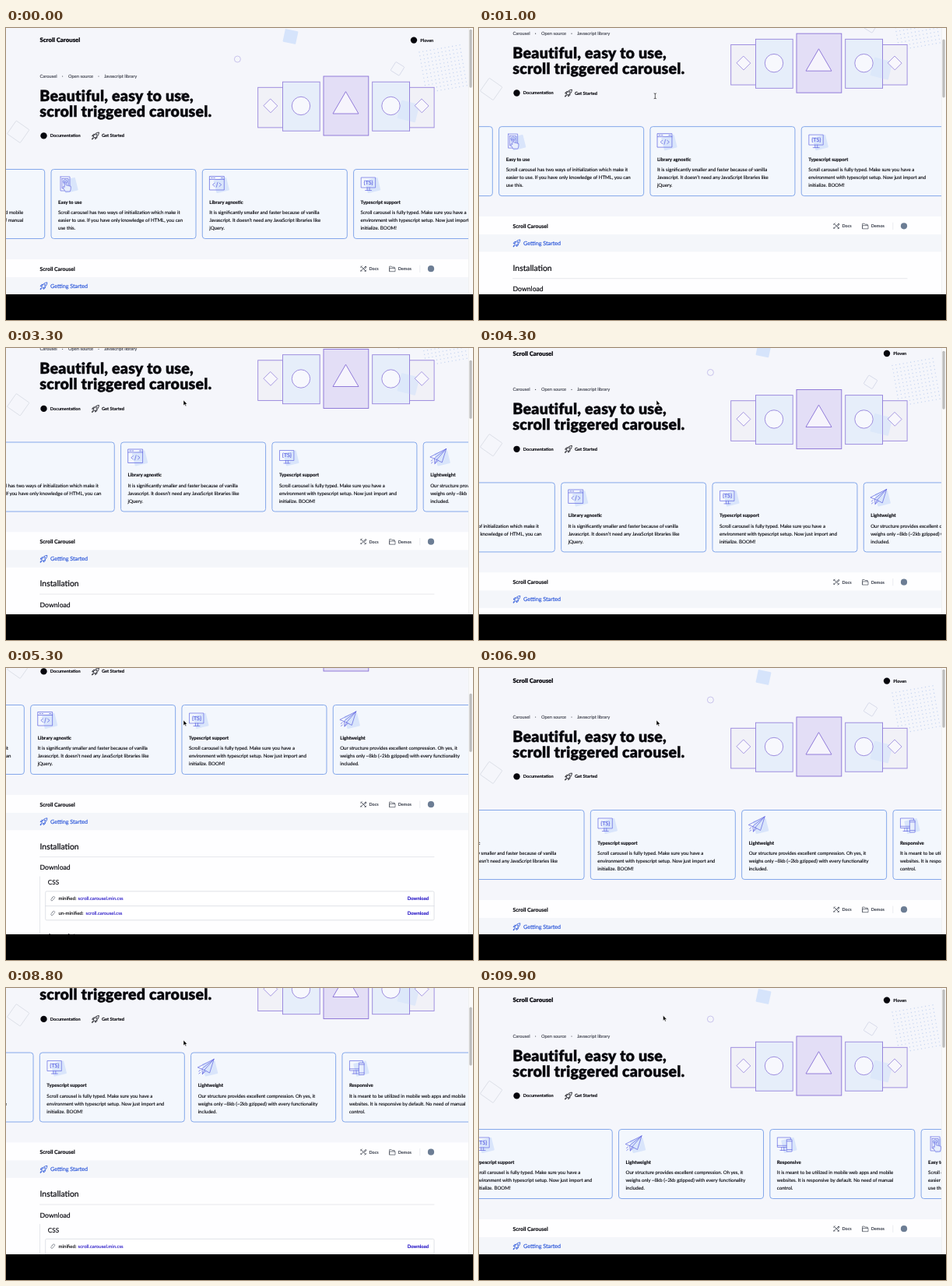
An HTML page that plays this animation: 600 by 375 pixels, repeating every 10000 ms.

```html
<!DOCTYPE html>
<html lang="en">
<head>
<meta charset="utf-8">
<title>Scroll Carousel</title>
<style>
  html, body { margin: 0; width: 100%; height: 100%; overflow: hidden; background: #000; }
  svg { display: block; width: 600px; height: 375px; }
  text { font-family: Lato, "Open Sans", sans-serif; text-rendering: geometricPrecision; white-space: pre; }
  .title { letter-spacing: .22px; }
  .line { fill: none; stroke-linecap: round; stroke-linejoin: round; }
</style>
</head>
<body>
<svg id="stage" viewBox="0 0 600 375"></svg>
<script>
const LOOP = 10000, STEP = 100, VIEW = 342;
const GAP = 194.3, FIRST = 58, CARD_TOP = 181.5, RATIO = 0.59;
const INK = '#06060c', INDIGO = '#5a5fe0', BLUE = '#2350d8', LINK = '#2716c6', GREY = '#474c58';

// Scroll position over time: [ms, px]
const scrollKeys = [
  [0, 0], [1900, 97], [2700, 119], [2800, 119], [3300, 60.5], [4100, -1],
  [5300, 134], [5600, 136.5], [5700, 136.5], [6900, -1], [8200, 133.5],
  [8500, 133.5], [8800, 98.5], [9600, 1], [9900, 0], [10000, 0]
];

const cards = [
  ['phone', 'Easy to use',
    'Scroll carousel has two ways of initialization which make it',
    'easier to use. If you have only knowledge of HTML, you can', 'use this.'],
  ['code', 'Library agnostic',
    'It is significantly smaller and faster because of vanilla',
    'Javascript. It doesn’t need any JavaScript libraries like', 'jQuery.'],
  ['types', 'Typescript support',
    'Scroll carousel is fully typed. Make sure you have a',
    'environment with typescript setup. Now just import and', 'initialize. BOOM!'],
  ['plane', 'Lightweight',
    'Our structure provides excellent compression. Oh yes, it',
    'weighs only ~8kb (~2kb gzipped) with every functionality', 'included.'],
  ['devices', 'Responsive',
    'It is meant to be utilized in mobile web apps and mobile',
    'websites. It is responsive by default. No need of manual', 'control.']
];

// y is the optical middle of the line; the thin stroke gives a medium weight
const text = (x, y, size, str, weight = 400, fill = INK, anchor = 'start') =>
  `<text x="${x}" y="${y + size * 0.35}" font-size="${size}" font-weight="${weight}" fill="${fill}" stroke="${fill}" stroke-width="${size * 0.02}" text-anchor="${anchor}">${str}</text>`;
const rect = (x, y, w, h, fill, stroke = 'none', more = '') =>
  `<rect x="${x}" y="${y}" width="${w}" height="${h}" fill="${fill}" stroke="${stroke}" ${more}/>`;
const circle = (x, y, r, fill, stroke = 'none', more = '') =>
  `<circle cx="${x}" cy="${y}" r="${r}" fill="${fill}" stroke="${stroke}" ${more}/>`;
const path = (d, stroke, width = 0.8, fill = 'none') =>
  `<path class="line" d="${d}" style="fill:${fill}" stroke="${stroke}" stroke-width="${width}"/>`;
const tilted = (x, y, size, deg, fill, stroke) =>
  rect(x - size / 2, y - size / 2, size, size, fill, stroke, `rx="1" stroke-width=".7" transform="rotate(${deg} ${x} ${y})"`);
const at = (x, y, body) => `<g transform="translate(${x} ${y})">${body}</g>`;

const rocket = color =>
  path('M2.5 5.5C4 2.5 6.5.8 9.6.6C9.5 3.7 7.8 6.2 4.8 7.6ZM2.7 5.2L.8 5.4L2.4 3.2H4M5 7.5L4.9 9.3L7 7.8L7.1 6.2M1 9.3C1 8 1.6 7.2 2.6 7.4C3 8.5 2.2 9.2 1 9.3Z', color) +
  circle(6.5, 3.7, 0.9, 'none', color, 'stroke-width=".7"');
const clip = path('M3 4L4.4 2.6C5.8 1.4 7.6 3.2 6.3 4.5L5 5.8M4.1 3.5L2.2 5.4C.9 6.8 2.6 8.6 4 7.2L5 6.2', '#666c78', 0.7);
const tools = path('M1.2 1.2L7.4 7.4M1 7.4L3.4 5M5 3.4L7.4 1L8 2.2L6 4.2M.8 2.4L2.4.8M6.2 7.8L7.8 6.2M1 6.4L2 7.4', GREY, 1);
const folder = path('M.6 7.4V1.2H3.2L4.1 2.2H7.2V3.6M.6 7.4V3.6H8V7.4Z', GREY, 0.7);

const icons = {
  phone: path('M12 9.5H24V22M17 27.5H12V9.5M14 12H22V20M14 12V24.5H16.5', INDIGO, 0.65) +
    circle(18, 15.8, 2.5, 'none', INDIGO, 'stroke-width=".65"') +
    path('M17.2 16V23L15.5 22C14.4 23 16.4 25.4 18.2 28.5H24.2C25.4 26 25.4 24 25.2 21.8L19 20.2V16Q18.1 14.8 17.2 16Z', INDIGO, 0.65, '#e7eefc'),
  code: path('M9.5 9H28V26.5H9.5ZM9.5 13H28M11.3 11H13M14.5 11H16M24 11H26.2M15.8 17.6L13.2 19.8L15.8 22M21.8 17.6L24.4 19.8L21.8 22M19.6 16.8L18 22.8', INDIGO, 0.7),
  types: path('M10 10.5H28V23.5H10ZM15 27H23M17.5 23.5V27M20.5 23.5V27', INDIGO, 0.65) +
    text(19, 16.8, 7, '{TS}', 400, INDIGO, 'middle'),
  plane: path('M9 18.8L29.5 8.4L24 26L17.2 22.4ZM29.5 8.4L14.2 20.6L14.8 27.6L17.2 22.4L29.5 8.4M14.8 27.6L19 23.6M10 24L12 22.5M10.2 27L12 25.6', INDIGO, 0.7),
  devices: path('M21.5 23H9.5V10.5H26.5V13M9.5 20.8H21.5M13 27H20M15 23V27M18 23V27', INDIGO, 0.65) +
    path('M21.8 13.2H28.2V28.5H21.8ZM21.8 15.3H28.2M21.8 26H28.2', INDIGO, 0.65, '#e7eefc')
};

function card(i) {
  const [icon, title, ...lines] = cards[(i + cards.length) % cards.length];
  return at(FIRST + GAP * i, CARD_TOP,
    rect(0, 0, 186, 89, '#f3f7fd', '#789fe8', 'rx="3.5" stroke-width=".9"') +
    tilted(24.5, 20.5, 17, -14, '#d9e5fb', 'none') +
    icons[icon] +
    text(9, 42.3, 6.15, title, 700) +
    lines.map((l, n) => text(9, 55.7 + n * 10, 6.17, l)).join(''));
}

function dots() {
  let out = '';
  for (let r = 0; r < 12; r++)
    for (let c = 0; c < 12; c++)
      out += circle(c * 4.8, r * 4.8, 0.7, '#c6d5f1');
  return `<g transform="translate(531 31) rotate(-10)">${out}</g>`;
}

function art() {
  const edge = '#9583dc';
  const panel = (x, y, w, h, fill, stroke = edge) => rect(x, y, w, h, fill, stroke, 'stroke-width=".9"');
  const diamond = x => path(`M${x} 91.2L${x + 8.8} 100L${x} 108.8L${x - 8.8} 100Z`, edge, 0.8, '#f8f7fc');
  const disc = x => circle(x, 100, 11.7, '#f7f8fd', edge, 'stroke-width=".9"');
  return panel(323.7, 76.3, 32, 51.6, '#f1f1f7') + panel(518.5, 76.3, 31.6, 51.6, '#f1f1f7') +
    panel(355.5, 69.2, 47.7, 63, '#e6eefa') + panel(470.7, 69.2, 47.8, 63, '#e6eefa') +
    `<g opacity=".75">${tilted(517, 107, 24, 14, '#d9e6fa', 'none')}</g>` +
    path('M518.5 69.2V132.2', edge, 0.8) +
    panel(408, 62, 57.8, 76, '#e3def6', '#8870d6') +
    diamond(340) + diamond(534.3) + disc(379) + disc(494.5) +
    path('M436.7 82L453 110H420.4Z', '#8870d6', 0.9, '#f6f4fc');
}

function hero() {
  return rect(0, -3, 594, 300, '#f5f6fb') +
    tilted(365.5, 11, 17, 12, '#d6e4fb', 'none') +
    circle(297.4, 40, 4, 'none', '#b5aee6', 'stroke-width=".7"') +
    tilted(503, 52.3, 13, 32, 'none', '#cfd2e4') +
    tilted(15.7, 133.3, 20.5, 35, 'none', '#d5d8e2') +
    dots() + art() +
    text(43.5, 15.7, 7.75, 'Scroll Carousel', 900) +
    circle(524, 15.6, 4.2, INK) + text(532.3, 15.8, 5.6, 'Ploven', 700) +
    text(43.5, 61.7, 5.75, 'Carousel', 400, '#3b3e4a') + circle(72.6, 62, 0.6, '#3b3e4a') +
    text(80, 61.7, 5.75, 'Open source', 400, '#3b3e4a') + circle(119, 62, 0.6, '#3b3e4a') +
    text(126, 61.7, 5.75, 'Javascript library', 400, '#3b3e4a') +
    `<g class="title">${text(43.3, 87, 19.6, 'Beautiful, easy to use,', 900)}${text(43.3, 107, 19.6, 'scroll triggered carousel.', 900)}</g>` +
    circle(48.5, 138.4, 4.2, INK) + text(56.8, 138.4, 5.6, 'Documentation', 700) +
    at(109.8, 133.4, rocket(INK)) + text(123, 138.4, 5.7, 'Get Started', 700);
}

function docs() {
  const row = (y, label, x, file) =>
    at(56, y - 4.8, clip) + text(67.5, y, 6.1, label) + text(x, y, 6.05, file, 400, LINK) +
    text(543.2, y, 6, 'Download', 700, LINK, 'end');
  return rect(0, 297, 594, 300, '#fefeff') +
    text(43.5, 309.2, 6.85, 'Scroll Carousel', 700) +
    at(454.8, 304.9, tools) + text(466.4, 309.2, 5.5, 'Docs', 700, GREY) +
    at(492, 304.9, folder) + text(503.7, 309.2, 5.5, 'Demos', 700, GREY) +
    path('M531.8 305V313.5', '#e3e5ea', 0.7) + circle(546, 309.2, 4.1, '#6c7d94') +
    rect(0, 320, 594, 22.3, '#f4f6fa') +
    at(43.3, 326.2, rocket(BLUE)) + text(57, 331.2, 7.2, 'Getting Started', 400, BLUE) +
    text(43.5, 363.3, 10.4, 'Installation') +
    path('M43.5 376.6H550', '#dddfe4', 0.7) +
    text(43.5, 390.2, 8.7, 'Download') +
    path('M43.5 402V560', '#dfe1e6', 0.8) +
    text(53.8, 409.4, 8.2, 'CSS') +
    rect(50.7, 420.8, 499.3, 37, '#fff', '#d9dbe1', 'rx="1.5" stroke-width=".8"') +
    path('M50.7 439.6H550', '#d9dbe1', 0.8) +
    row(430, 'minified:', 92.6, 'scroll.carousel.min.css') +
    row(448.8, 'un-minified:', 102.6, 'scroll.carousel.css') +
    text(53.8, 477.8, 8.2, 'Javascript');
}

const stage = document.getElementById('stage');
stage.innerHTML =
  `<defs><clipPath id="view"><rect width="594" height="${VIEW}"/></clipPath></defs>` +
  rect(0, 0, 600, 375, '#000') + rect(0, 0, 600, VIEW, '#fff') +
  `<g clip-path="url(#view)"><g id="page">${hero()}<g id="row">${[-1, 0, 1, 2, 3, 4, 5].map(card).join('')}</g>${docs()}</g></g>` +
  rect(594, 0, 6, VIEW, '#fafafa') + rect(594, 0, 0.5, VIEW, '#e6e6e6') +
  `<g id="thumb">${rect(595.4, 0, 3.3, 75, '#bdbdbd', 'none', 'rx="1.6"')}</g>` +
  `<g id="beam">${path('M-1.2 -3.4Q0 -3.4 0 -2.6Q0 -3.4 1.2 -3.4M0 -2.8V2.8M-1.2 3.4Q0 3.4 0 2.6Q0 3.4 1.2 3.4', '#222', 0.7)}</g>` +
  `<g id="arrow"><path d="M0 0V6.8L1.6 5.4L2.7 7.8L3.8 7.3L2.7 5H4.8Z" fill="#000" stroke="#fff" stroke-width=".5"/></g>`;

const [page, row, thumb, beam, arrow] =
  ['page', 'row', 'thumb', 'beam', 'arrow'].map(id => document.getElementById(id));
const move = (el, x, y) => el.setAttribute('transform', `translate(${x.toFixed(2)} ${y.toFixed(2)})`);

// Monotone cubic through the keys: flat at every turn
const slope = i => (scrollKeys[i + 1][1] - scrollKeys[i][1]) / (scrollKeys[i + 1][0] - scrollKeys[i][0]);
const tangents = scrollKeys.map((_, i) => {
  if (i === 0) return slope(0);
  if (i === scrollKeys.length - 1) return 0;
  const a = slope(i - 1), b = slope(i);
  return a * b <= 0 ? 0 : 2 * a * b / (a + b);
});

// The row advances by the distance scrolled, whichever the direction
function scrollAt(t) {
  let i = 0, travel = 0;
  while (i < scrollKeys.length - 2 && t >= scrollKeys[i + 1][0]) {
    travel += Math.abs(scrollKeys[i + 1][1] - scrollKeys[i][1]);
    i++;
  }
  const [t0, a] = scrollKeys[i], [t1, b] = scrollKeys[i + 1];
  const h = t1 - t0, u = (t - t0) / h, v = 1 - u;
  const y = (1 + 2 * u) * v * v * a + u * v * v * h * tangents[i] +
    u * u * (3 - 2 * u) * b - u * u * v * h * tangents[i + 1];
  return { y, travel: travel + Math.abs(y - a) };
}

function draw(now) {
  const t = Math.floor(now % LOOP / STEP) * STEP;
  const { y, travel } = scrollAt(t);
  move(page, 0, -y);
  move(row, -travel * RATIO, 0);
  move(thumb, 0, 1.7 + Math.max(0, y) * 0.232);

  const onText = t < 2400;
  beam.style.display = onText ? '' : 'none';
  arrow.style.display = onText ? 'none' : '';
  move(beam, 226.3, 87.3);
  const k = Math.min(1, Math.max(0, (t - 9300) / 500));
  const e = k * k * (3 - 2 * k);
  move(arrow, 228 + 8.5 * e, 67 - 31.8 * e);
}

function tick() {
  draw(performance.now());
  requestAnimationFrame(tick);
}
tick();
</script>
</body>
</html>
```
